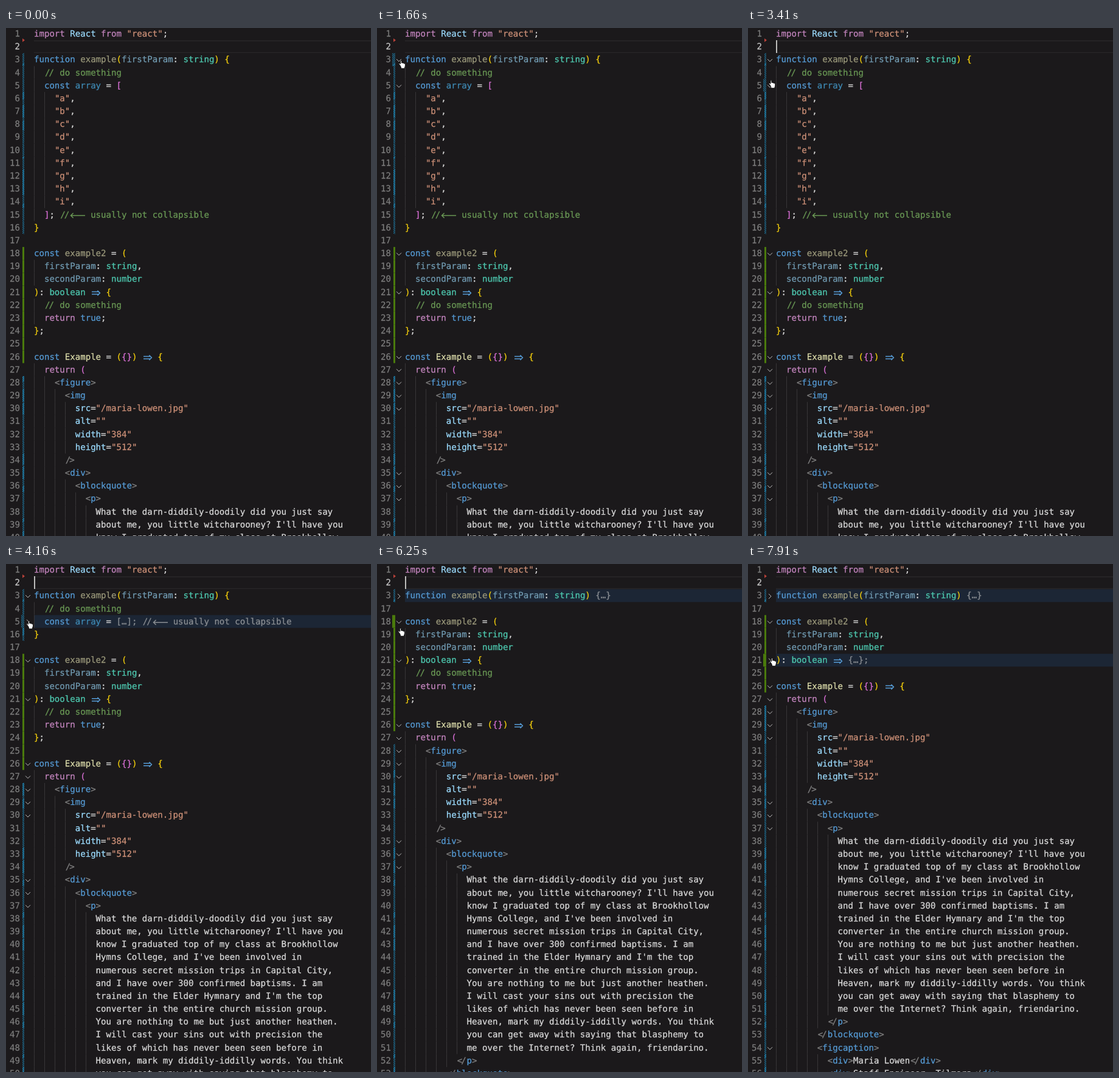
An HTML page for the animation above (8000 ms loop, 600 by 833 pixels).

```html
<!DOCTYPE html>
<html lang="en">
<head>
<meta charset="utf-8">
<title>Code folding</title>
<style>
  html, body { margin: 0; width: 100%; height: 100%; overflow: hidden; background: #1b191b; }
  #stage {
    position: relative; width: 600px; height: 833px; overflow: hidden;
    font: 14.07px/21.18px "DejaVu Sans Mono", monospace;
    text-rendering: geometricPrecision; font-variant-ligatures: none;
    -webkit-text-stroke: .25px currentColor;
    white-space: pre; color: #dadada; --fade: 0;
  }
  .row { position: absolute; left: 0; top: -1.2px; width: 600px; height: 21.18px; }
  .row > * { position: absolute; top: 0; height: 100%; }
  .row > .num, .row > .code, .row > .chevron { top: .7px; }
  .num { left: 0; width: 23px; text-align: right; color: #7d7d7d; }
  .active .num { color: #c6c6c6; }
  .code { left: 46px; }
  .short, .folded .full { display: none; }
  .folded .short { display: block; }
  .back { left: 46px; right: 0; }
  .folded .back { background: #1c2635; }
  .active .back { box-shadow: inset 0 1.5px #292729, inset 0 -1.5px #292729; }
  .guide { width: 1px; background: #383638; }
  .bar { left: 27px; width: 3px; height: 21.6px !important; }
  .hover .bar { left: 25px; width: 5px; }
  .added { background: #4a7a0c; }
  .changed { background: repeating-linear-gradient(-45deg, #1f82ae 0 1px, #1b2a33 1px 2.1px); }
  .chevron { left: 30px; width: 12px; opacity: var(--fade); }
  .folded .chevron { opacity: 1; }
  .chevron path { transform-origin: 6px 10.6px; }
  .folded .chevron path { transform: rotate(-90deg); }
  svg { overflow: visible; fill: none; stroke: currentColor; stroke-width: 1.5; }
  .chevron { color: #bdbdbd; stroke-width: 1; }
  .arrow { height: 21.18px; vertical-align: top; }
  .tight { letter-spacing: -2px; padding: 0 3px 0 1px; }
  #removed { position: absolute; left: 27px; top: 16.5px; border: solid transparent; border-width: 3.5px 0 3.5px 4px; border-left-color: #b8423a; }
  #caret { position: absolute; left: 46px; top: 20px; width: 1.5px; height: 21px; background: #bdbdbb; }
  #pointer { position: absolute; left: 0; top: 0; width: 12px; height: 15px; }
  #hand { fill: #fff; stroke: #111; stroke-width: 1; }
  #beam { stroke: #ddd; stroke-width: 1.2; }
  .k { color: #c586c0 } .b { color: #569cd6 } .v { color: #9cdcfe } .s { color: #ce9178 }
  .y { color: #4ec9b0 } .c { color: #6a9955 } .f { color: #dcdcaa } .o { color: #f2cd0c }
  .m { color: #da70d6 } .a { color: #808080 } .g { color: #8a8e93 }
  .F { color: #9b997b } .V { color: #719bb2 } .A { color: #3e89b3 }
</style>
</head>
<body>
<div id="stage"></div>
<script>
const PITCH = 21.18, CHAR = 8.47, LEFT = 46, TOP = -1.2, LOOP = 8000;

// Each segment after "|" starts with the class that colours it.
const prose = `What the darn-diddily-doodily did you just say
about me, you little witcharooney? I'll have you
know I graduated top of my class at Brookhollow
Hymns College, and I've been involved in
numerous secret mission trips in Capital City,
and I have over 300 confirmed baptisms. I am
trained in the Elder Hymnary and I'm the top
converter in the entire church mission group.
You are nothing to me but just another heathen.
I will cast your sins out with precision the
likes of which has never been seen before in
Heaven, mark my diddily-iddilly words. You think
you can get away with saying that blasphemy to
me over the Internet? Think again, friendarino.`;

const pad = n => "p" + " ".repeat(n) + "|";
const open = (n, tag) => `${pad(n)}a<|b${tag}|a>`;
const close = (n, tag) => `${pad(n)}a</|b${tag}|a>`;
const attr = (name, value) => `${pad(8)}v${name}|p=|s"${value}"`;
const caption = text => `${open(10, "div")}|p${text}|a</|bdiv|a>`;

const source = [
  'kimport |vReact |kfrom |s"react"|p;',
  "",
  "bfunction |Fexample|o(|VfirstParam|p: |ystring|o) |o{",
  pad(2) + "c// do something",
  pad(2) + "bconst |Aarray|p = |m[",
  ...[..."abcdefghi"].map(letter => `${pad(4)}s"${letter}"|p,`),
  pad(2) + "m]|p; |c//<-- usually not collapsible",
  "o}",
  "",
  "bconst |Fexample2|p = |o(",
  pad(2) + "VfirstParam|p: |ystring|p,",
  pad(2) + "VsecondParam|p: |ynumber",
  "o)|p: |yboolean |b=> |o{",
  pad(2) + "c// do something",
  pad(2) + "kreturn |btrue|p;",
  "o}|p;",
  "",
  "bconst |fExample|p = |o(|m{}|o) |b=> |o{",
  pad(2) + "kreturn |m(",
  open(4, "figure"),
  pad(6) + "a<|bimg",
  attr("src", "/maria-lowen.jpg"),
  attr("alt", ""),
  attr("width", "384"),
  attr("height", "512"),
  pad(6) + "a/>",
  open(6, "div"),
  open(8, "blockquote"),
  open(10, "p"),
  ...prose.split("\n").map(text => pad(12) + "p" + text),
  close(10, "p"),
  close(8, "blockquote"),
  open(8, "figcaption"),
  caption("Maria Lowen"),
  caption("Staff Engineer, Tilmora"),
];

const foldable = new Set([3, 5, 18, 21, 26, 27, 28, 29, 30, 35, 36, 37, 54]);
const folds = {
  3: { end: 16, rest: "g{…}" },
  5: { end: 15, rest: "g[…]; //<-- usually not collapsible" },
  21: { end: 24, rest: "g{…};" },
};
const foldSteps = [[0, []], [2000, [3]], [2950, []], [3750, [5]], [5160, []], [5750, [3]], [7150, [3, 21]]];
const path = [
  [150, 562, 850], [830, 362, 768], [1630, 39.5, 52], [3050, 39.5, 52], [3550, 37.5, 92],
  [5220, 37.5, 92], [5500, 35.5, 52], [5880, 35.5, 52], [6200, 38.5, 104], [6500, 38.5, 104],
  [6900, 39.5, 153], [LOOP, 39.5, 153],
];

const arrows = {
  "=>": [2, "M2 9H13.8M2 13H13.8M11.4 7L15.4 11L11.4 15"],
  "<--": [3, "M1.5 11H25M5.6 7L1.5 11L5.6 15"],
};
const escape = text => text.replace(/</g, "&lt;").replace(/>/g, "&gt;");

function glyphs(text) {
  return text.split(/(\/\/|<--|=>|\/>|<\/)/).map((part, i) => {
    if (i % 2 === 0) return escape(part);
    if (!arrows[part]) return `<span class="tight">${escape(part)}</span>`;
    const [cells, d] = arrows[part];
    return `<svg class="arrow" width="${cells * CHAR}"><path d="${d}"/></svg>`;
  }).join("");
}

const paint = code => code.split("|").filter(Boolean)
  .map(part => `<span class="${part[0]}">${glyphs(part.slice(1))}</span>`).join("");

function barClass(n) {
  if (n >= 18 && n <= 26) return "added";
  return (n >= 3 && n <= 16) || n >= 28 ? "changed" : "";
}

function makeRow(code, i) {
  const n = i + 1, fold = folds[n];
  const indent = code.match(/^p( +)\|/)?.[1].length ?? 0;
  let html = '<div class="back"></div>';
  for (let col = 0; col < indent; col += 2)
    html += `<div class="guide" style="left:${Math.round(LEFT + col * CHAR)}px"></div>`;
  html += `<div class="num">${n}</div><div class="bar ${barClass(n)}"></div>`;
  html += `<div class="code full">${paint(code)}</div>`;
  if (fold) {
    const head = code.slice(0, code.lastIndexOf("|") + 1);
    html += `<div class="code short">${paint(head + fold.rest)}</div>`;
  }
  if (foldable.has(n)) html += '<svg class="chevron"><path d="M2 8.6L6 12.6L10 8.6"/></svg>';
  const row = document.createElement("div");
  row.className = n === 2 ? "row active" : "row";
  row.innerHTML = html;
  return row;
}

const stage = document.getElementById("stage");
const rows = source.map(makeRow);
stage.append(...rows);
stage.insertAdjacentHTML("beforeend", `
  <div id="removed"></div><div id="caret"></div>
  <svg id="pointer">
    <path id="hand" d="M3.2 9L1.2 6.6C.4 5.6 1.6 4.6 2.6 5.4L3.6 6.4V1.6C3.6 .4 5.6 .4 5.6 1.6V4.6C6.2 4 7.4 4.2 7.6 5C8.4 4.5 9.4 4.9 9.6 5.7C10.4 5.3 11.4 5.9 11.4 6.9V9C11.4 10.6 10.4 11.4 10.4 13.6H4.6C4.6 11.6 3.8 10 3.2 9Z"/>
    <path id="beam" d="M2 -7Q4.5 -7 4.5 -5Q4.5 -7 7 -7M4.5 -5V5M2 7Q4.5 7 4.5 5Q4.5 7 7 7"/>
  </svg>`);
const [caret, pointer, hand, beam] = ["caret", "pointer", "hand", "beam"].map(id => document.getElementById(id));

function pointerAt(t) {
  if (t <= path[0][0]) return path[0].slice(1);
  const i = path.findIndex(key => key[0] > t);
  const [t0, x0, y0] = path[i - 1], [t1, x1, y1] = path[i];
  const u = (t - t0) / (t1 - t0), ease = u * u * (3 - 2 * u);
  return [x0 + (x1 - x0) * ease, y0 + (y1 - y0) * ease];
}

function render(t) {
  const closed = foldSteps.filter(step => step[0] <= t).pop()[1];
  const [x, y] = pointerAt(t);
  const inGutter = x < LEFT;
  const hovered = inGutter ? Math.floor((y - TOP) / PITCH) : -1;

  let slot = 0;
  rows.forEach((row, i) => {
    const n = i + 1;
    const hidden = closed.some(start => n > start && n <= folds[start].end);
    row.style.display = hidden ? "none" : "";
    if (hidden) return;
    row.style.transform = `translateY(${slot * PITCH}px)`;
    row.classList.toggle("folded", closed.includes(n));
    row.classList.toggle("hover", slot === hovered);
    slot++;
  });

  stage.style.setProperty("--fade", Math.min(1, Math.max(0, (t - 1480) / 160)));
  caret.style.opacity = (t + 910) % 1000 < 500 ? 1 : 0;
  pointer.style.transform = `translate(${x - 4.5}px, ${y + 0.7}px)`;
  hand.style.display = inGutter ? "" : "none";
  beam.style.display = inGutter ? "none" : "";
}

const start = performance.now();
function tick() {
  render((performance.now() - start) % LOOP);
  requestAnimationFrame(tick);
}
tick();
</script>
</body>
</html>
```
